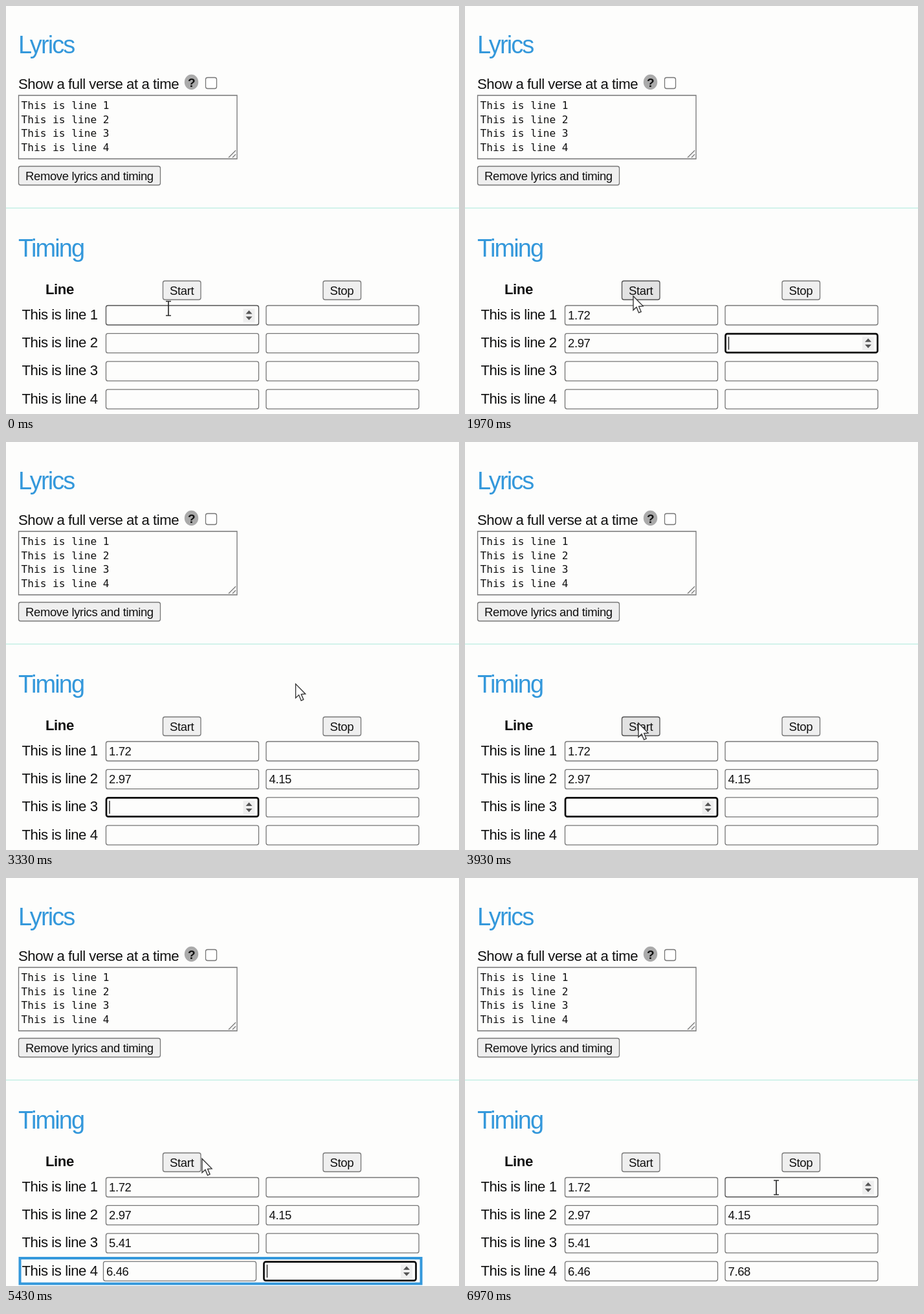
Write an HTML page with a canvas that moves like this. It is 700 px wide and 630 px high and loops after 7010 ms.

```html
<!DOCTYPE html>
<html lang="en">
<head>
<meta charset="utf-8">
<title>Lyric timing</title>
<style>
  html, body { margin: 0; width: 100%; height: 100%; overflow: hidden; background: #fdfdfc; }
  canvas { display: block; }
</style>
</head>
<body>
<canvas id="stage" width="700" height="630"></canvas>
<script>
const ctx = document.getElementById('stage').getContext('2d');
const LOOP = 7010, PRESS = 140, BLINK = 500, SONG_OFFSET = 1180, ROWS = 4;
const SANS = '"Liberation Sans", Arial, sans-serif';
const MONO = '"DejaVu Sans Mono", monospace';
const PAPER = '#fdfdfc', INK = '#111', BLUE = '#3498db', BUTTON = '#efefef', HOVER = '#e2e2e2';
const EDGE = '#767676', DARK_EDGE = '#4f4f4f';
const BODY = 22.2, SMALL = 18.5;
const COLUMNS = [154.5, 402], ROW_TOP = 462.5, ROW_STEP = 43.2, INPUT_W = 236, INPUT_H = 30;

// "Start" opens a new row, "Stop" closes the current one.
const clicks = [
  { time: 540, col: 0 }, { time: 1790, col: 0 }, { time: 2970, col: 1 },
  { time: 4230, col: 0 }, { time: 5280, col: 0 }, { time: 6500, col: 1 }
];
clicks.forEach((click, i) => {
  click.row = clicks.slice(0, i + 1).filter(c => c.col === 0).length - 1;
  click.value = ((click.time + SONG_OFFSET) / 1000).toFixed(2);
});

const home = { x: 251, y: 467 };
const glides = [
  { from: 30, to: 360, x: 260, y: 448 },
  { from: 2050, to: 2680, x: 516, y: 430 },
  { from: 3070, to: 3825, x: 268, y: 434, lift: 65 },
  { from: 5320, to: 5790, x: 516, y: 430 },
  { from: 6740, to: 6960, x: 481, y: 478 }
];

function pointerAt(t) {
  let { x, y } = home;
  for (const g of glides) {
    const u = Math.min(1, Math.max(0, (t - g.from) / (g.to - g.from)));
    const eased = u * u * (3 - 2 * u);
    x += (g.x - x) * eased;
    y += (g.y - y) * eased - (g.lift || 0) * Math.sin(Math.PI * u);
  }
  return { x, y };
}

function text(str, x, y, size, { color = INK, family = SANS, weight = '', tracking = -.02 } = {}) {
  ctx.font = `${weight} ${size}px ${family}`;
  ctx.letterSpacing = `${tracking * size}px`;
  ctx.fillStyle = color;
  ctx.fillText(str, x, y);
}

const heading = (str, y) => text(str, 19, y, 38, { color: BLUE, tracking: -.05 });

function box(x, y, w, h, fill, stroke, line = 1.3, radius = 3) {
  ctx.beginPath();
  ctx.roundRect(x, y, w, h, radius);
  ctx.fillStyle = fill;
  ctx.fill();
  ctx.strokeStyle = stroke;
  ctx.lineWidth = line;
  ctx.stroke();
}

function line(x0, y0, x1, y1, color, width) {
  ctx.beginPath();
  ctx.moveTo(x0, y0);
  ctx.lineTo(x1, y1);
  ctx.strokeStyle = color;
  ctx.lineWidth = width;
  ctx.stroke();
}

const inside = (p, x, y, w, h) => p.x >= x && p.x <= x + w && p.y >= y && p.y <= y + h;

function button(label, x, y, w, h, pointer) {
  const hover = inside(pointer, x, y, w, h);
  box(x, y, w, h, hover ? HOVER : BUTTON, hover ? DARK_EDGE : EDGE);
  text(label, x + 10.5, y + 21, SMALL);
}

function spinner(x, y) {
  ctx.fillStyle = BUTTON;
  ctx.fillRect(x - 9, y - 10, 18, 21);
  ctx.fillStyle = '#555';
  for (const side of [-1, 1]) {
    ctx.beginPath();
    ctx.moveTo(x - 5, y + 2 * side);
    ctx.lineTo(x, y + 7.5 * side);
    ctx.lineTo(x + 5, y + 2 * side);
    ctx.fill();
  }
}

function field(x, y, value, focused, hover, caret) {
  if (focused) box(x + .5, y + .5, INPUT_W - 1, INPUT_H - 1, PAPER, '#0c0c0c', 2.7);
  else box(x, y, INPUT_W, INPUT_H, PAPER, hover ? DARK_EDGE : EDGE);
  if (focused || hover) spinner(x + 221, y + 15);
  if (caret) line(x + 5.5, y + 5, x + 5.5, y + 25, INK, 1.3);
  text(value, x + 4.5, y + 21.5, SMALL);
}

function drawPointer({ x, y }, beam) {
  ctx.save();
  ctx.translate(x, y);
  if (beam) {
    line(0, -11, 0, 11, '#222', 1.6);
    for (const end of [-11, 11]) line(-4, end, 4, end, '#222', 1.4);
  } else {
    ctx.scale(1.35, 1.35);
    const arrow = new Path2D('M0 0V16L3.7 12.6 6.3 19 9 17.8 6.4 11.8 11.2 11.4Z');
    ctx.fillStyle = '#fff';
    ctx.fill(arrow);
    ctx.strokeStyle = '#333';
    ctx.lineWidth = 1;
    ctx.stroke(arrow);
  }
  ctx.restore();
}

function drawPage(pointer) {
  ctx.fillStyle = PAPER;
  ctx.fillRect(0, 0, 700, 630);

  heading('Lyrics', 73);
  text('Show a full verse at a time', 19, 128, BODY);
  ctx.beginPath();
  ctx.ellipse(286.5, 117.5, 10.7, 11.7, 0, 0, 2 * Math.PI);
  ctx.fillStyle = '#aaa';
  ctx.fill();
  text('?', 281, 124.5, 19, { weight: 'bold' });
  box(308.5, 110.5, 17, 17, '#fff', EDGE);

  box(19.5, 138, 337.5, 98, PAPER, EDGE, 1.3, 0);
  for (let i = 0; i < ROWS; i++) {
    text(`This is line ${i + 1}`, 23.5, 159 + i * 21.6, 16.15, { family: MONO, tracking: 0 });
  }
  for (const size of [11, 5]) line(355 - size, 234, 355, 234 - size, EDGE, 1.2);
  button('Remove lyrics and timing', 19.5, 247.5, 219, 29, pointer);

  line(0, 312, 700, 312, '#c5f0e6', 1.6);

  heading('Timing', 387);
  text('Line', 61, 444.5, BODY, { weight: 'bold' });
  button('Start', 242.5, 424.5, 58.5, 29, pointer);
  button('Stop', 490, 424.5, 58.5, 29, pointer);
}

function focusAfter(click) {
  return click.col === 0 ? { row: click.row, col: 1 } : { row: click.row + 1, col: 0 };
}

function draw(t) {
  const pointer = pointerAt(t);
  const done = clicks.filter(c => c.time <= t);
  const last = done[done.length - 1];
  const pressing = clicks.some(c => t >= c.time - PRESS && t < c.time);
  const focus = last && !pressing ? focusAfter(last) : null;
  const caretOn = last && (t - last.time) % (2 * BLINK) < BLINK;
  let beam = false;

  drawPage(pointer);
  for (let row = 0; row < ROWS; row++) {
    const y = ROW_TOP + row * ROW_STEP;
    const playing = row === ROWS - 1 && last && last.row === row && last.col === 0;
    if (playing) box(21.5, 587, 620, 39.5, PAPER, BLUE, 4, 0);
    text(`This is line ${row + 1}`, 24.5, y + 21.5, BODY);
    COLUMNS.forEach((left, col) => {
      const x = playing ? left - 4 : left;
      const entry = done.find(c => c.row === row && c.col === col);
      const focused = !!focus && focus.row === row && focus.col === col;
      const hover = inside(pointer, x, y, INPUT_W, INPUT_H);
      beam = beam || hover;
      field(x, y, entry ? entry.value : '', focused, hover, focused && caretOn);
    });
  }
  drawPointer(pointer, beam);
}

const began = performance.now();
function tick() {
  draw((performance.now() - began) % LOOP);
  requestAnimationFrame(tick);
}
tick();
</script>
</body>
</html>
```
